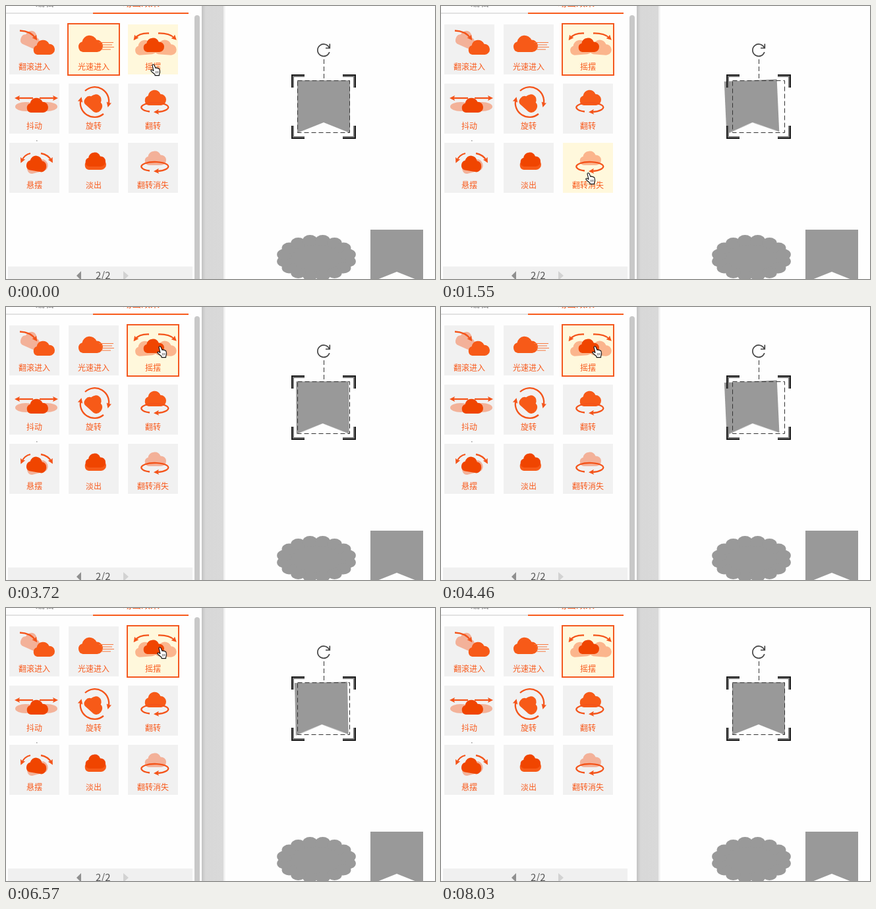
An HTML page that plays this animation: 651 by 415 pixels, repeating every 8870 ms.

```html
<!DOCTYPE html>
<html lang="zh-CN">
<head>
<meta charset="utf-8">
<title>动画效果</title>
<style>
html, body { margin: 0; width: 100%; height: 100%; overflow: hidden; background: #fefefe; }
svg { display: block; width: 651px; height: 415px; }
text { font-family: "Noto Sans CJK SC", "Noto Sans CJK", sans-serif; }
.label { font-size: 12px; fill: #f85a1c; text-anchor: middle; }
.mid { fill: #f75a18; }
.dark { fill: #f04500; }
.pale { fill: #f55a20; opacity: .42; }
.line { fill: none; stroke: #f4541a; stroke-width: 2.3; }
.speed { fill: none; stroke: #f7783f; }
.gray { fill: #999; }
.dash { fill: none; stroke: #333; stroke-dasharray: 7 4; }
#banner { transform-box: fill-box; transform-origin: center; }
</style>
</head>
<body>
<svg id="stage" viewBox="0 0 651 415">
  <defs>
    <path id="cloud" d="M8 24A7.5 7.5 0 0 1 7 9.5A10.5 10.5 0 0 1 27 7A8.5 8.5 0 0 1 28 24z"/>
    <marker id="head" viewBox="0 0 8 8" refX="4" refY="4" markerWidth="8" markerHeight="8" markerUnits="userSpaceOnUse" orient="auto-start-reverse">
      <path d="M0 0L8 4L0 8L1.5 4z" fill="#f4541a"/>
    </marker>
    <linearGradient id="gutter">
      <stop offset="0" stop-color="#c2c2c2"/>
      <stop offset=".18" stop-color="#d8d8d8"/>
      <stop offset="1" stop-color="#d9d9d9"/>
    </linearGradient>
    <g id="bracket" fill="none">
      <path d="M20 1H1V20" stroke="#1c1c1c" stroke-width="2"/>
      <path d="M20 3H3V20" stroke="#777" stroke-width="2"/>
    </g>
  </defs>

  <rect width="651" height="415" fill="#fefefe"/>
  <rect x="297" width="33" height="415" fill="url(#gutter)"/>
  <rect x="330" width="2.5" height="415" fill="#f0f0f0"/>

  <text x="45" y="0" font-size="14" fill="#666">编辑</text>
  <text x="177" y="0" font-size="14" fill="#f85a1c">动画效果</text>
  <rect y="10" width="132" height="2" fill="#e2e2e2"/>
  <rect x="132" y="10" width="145" height="2" fill="#f85a1c"/>
  <rect x="46" y="204" width="1.5" height="1.5" fill="#999"/>

  <g id="cells"></g>
  <rect id="select" y="27" width="78" height="78" fill="none" stroke="#f4581f" stroke-width="2"/>

  <rect id="bar" x="286" y="14" width="8" height="420" rx="4" fill="#c8c8c8"/>
  <rect x="3" y="396" width="280" height="19" fill="#f0f0f0"/>
  <path d="M107 410L114 403V417z" fill="#8f8f8f"/>
  <path d="M186 410L178 403V417z" fill="#d2d2d2"/>
  <text x="136" y="415" font-size="15" fill="#555">2/2</text>

  <g id="scallop" class="gray"><ellipse cx="471" cy="383" rx="52" ry="29"/></g>
  <path class="gray" d="M553 340H633V420L593 404L553 420z"/>

  <path id="banner" class="gray" d="M442 113H522V193L482 177L442 193z"/>
  <path class="dash" d="M482.5 81V113"/>
  <rect class="dash" x="442.5" y="113.5" width="79" height="79"/>
  <use href="#bracket" transform="translate(433 104)"/>
  <use href="#bracket" transform="translate(531 104) scale(-1 1)"/>
  <use href="#bracket" transform="translate(433 202) scale(1 -1)"/>
  <use href="#bracket" transform="translate(531 202) scale(-1 -1)"/>
  <path d="M490.5 63.5A9.2 9.2 0 1 0 490.8 70M491.3 57.5V64H485" fill="none" stroke="#444" stroke-width="1.7"/>

  <g id="cursor" stroke="#111" fill="#fff" stroke-linejoin="round">
    <g id="hand">
      <path d="M3 2Q4-.2 5.8 1.5L8 6.5Q9.2 5.2 10.2 6.6Q11.5 5.8 12.3 7.2Q13.6 7 14 8.5L14.6 12Q14.6 14 13.6 15.3V17.6H7V16L2.2 12Q.2 10 1.2 9.2Q2.6 8.5 4.2 10.2L5 10.4z" stroke-width="1.1"/>
      <path d="M8.4 11V14.5M10.4 11V14.5M12.3 11V14" fill="none" stroke-width=".6"/>
    </g>
    <path id="arrow" d="M.5.5V14.5L3.8 11.5L6.2 17L8.5 16L6.2 10.7H10.5z" fill="#111" stroke="#fff"/>
  </g>
</svg>
<script>
const LOOP = 8870, STEP = 56.67, WOBBLE = 1880;
const $ = id => document.getElementById(id);

const cloud = (x, y, w, h, cls = 'mid', turn = 0) =>
  `<use href="#cloud" class="${cls}" transform="translate(${x + w / 2} ${y + h / 2}) rotate(${turn}) scale(${w / 36} ${h / 24}) translate(-18 -12)"/>`;
const line = d => `<path class="line" d="${d}" marker-end="url(#head)"/>`;
const oval = x => `<ellipse class="pale" cx="${x}" cy="35" rx="16" ry="7"/>`;
const ring = line('M33 42.5A20.5 7 0 1 1 43 43');

// Icons are drawn inside a 76 x 76 cell.
const effects = [
  ['翻滚进入', cloud(17, 9, 31, 25, 'pale', 24) + cloud(35, 23, 34, 23) + line('M16 9.5Q32 10 40 21')],
  ['光速进入', cloud(13, 16, 39, 26) +
    '<path class="speed" d="M46 27.5H68M49 31H66M50 34.5H69M49 38H64"/>'],
  ['摇摆', cloud(9, 23, 35, 23, 'pale', -4) + cloud(39, 23, 35, 23, 'pale', 4) + cloud(22, 20, 33, 22, 'dark') +
    line('M32 13.5Q17 13 11 21') + line('M46 13.5Q63 13 71 21')],
  ['抖动', oval(25) + oval(57) + cloud(25, 21, 34, 23, 'dark') + line('M36 22H12') + line('M46 22H70')],
  ['旋转', cloud(24, 15, 31, 25, 'mid', 42) +
    line('M25 11A21.5 21.5 0 0 1 60.5 32') + line('M53 46A21.5 21.5 0 0 1 18.5 24')],
  ['翻转', cloud(24, 9, 34, 24) + ring],
  ['悬摆', cloud(24, 20, 34, 25, 'pale', -14) + cloud(25, 19, 32, 24, 'dark', 10) +
    line('M32 16Q23 18 19 27') + line('M48 16Q59 18 64 27')],
  ['淡出', cloud(23, 18, 34, 23) + cloud(24, 14, 32, 22, 'dark')],
  ['翻转消失', cloud(24, 12, 34, 22, 'pale') + ring]
];

$('cells').innerHTML = effects.map(([name, icon], i) => `
  <g transform="translate(${5 + i % 3 * 90} ${28 + Math.floor(i / 3) * 90})">
    <rect class="cell" width="76" height="76"/>${icon}
    <text class="label" x="38" y="69">${name}</text>
  </g>`).join('');
const cells = document.querySelectorAll('.cell');

for (let i = 0; i < 16; i++) {
  const a = (i + 0.5) * Math.PI / 8;
  $('scallop').insertAdjacentHTML('beforeend',
    `<ellipse cx="${471 + 49.5 * Math.cos(a)}" cy="${383 + 27 * Math.sin(a)}" rx="11.3" ry="8.5"/>`);
}

// Wobble: offset, shift in px, tilt in degrees.
const wobble = $('banner').animate(
  [[0, 0, 0], [.15, -20, -5], [.3, 16, 3], [.45, -12, -3], [.6, 8, 2], [.75, -4, -1], [1, 0, 0]]
    .map(([offset, x, r]) => ({ offset, easing: 'ease', transform: `translateX(${x}px) rotate(${r}deg)` })),
  { duration: WOBBLE, fill: 'both' });
wobble.pause();

// First visible step of each run and the time already elapsed in it.
const runs = [[740, 77], [3720, 25], [6280, 77]];

const path = [
  [0, 219, 88], [700, 219, 88], [1030, 214, 135], [1450, 219, 253], [2320, 219, 253],
  [2530, 227, 104], [2710, 227, 104], [2880, 227, 58], [3310, 227, 58], [3420, 229, 59],
  [6620, 229, 59], [7120, 313, 333], [7350, 318, 391], [LOOP, 318, 391]
];

// Cell index, hover start and end.
const hovers = [[5, 1110, 1340], [8, 1340, 2420], [5, 2420, 2590]];

function along(t) {
  const i = path.findIndex(p => p[0] > t);
  const [t0, x0, y0] = path[i - 1], [t1, x1, y1] = path[i];
  const k = (t - t0) / (t1 - t0);
  return [x0 + (x1 - x0) * k, y0 + (y1 - y0) * k];
}

function draw(t) {
  const run = runs.filter(r => r[0] <= t).pop();
  wobble.currentTime = run
    ? Math.min(WOBBLE, Math.floor((t - run[0]) / STEP) * STEP + run[1]) : 0;

  const picked = t < 530 ? 1 : 2;
  $('select').setAttribute('x', 4 + picked * 90);
  cells.forEach((cell, i) => {
    const lit = i === picked || (i === 2 && t < 530) ||
      hovers.some(([c, from, to]) => c === i && t >= from && t < to);
    cell.setAttribute('fill', lit ? '#fff8dc' : '#f1f1f1');
  });

  const [x, y] = along(t), outside = x > 263;
  $('cursor').setAttribute('transform', `translate(${Math.round(x)} ${Math.round(y)})`);
  $('cursor').style.display = t < 7450 ? '' : 'none';
  $('hand').style.display = outside ? 'none' : '';
  $('arrow').style.display = outside ? '' : 'none';
  $('bar').style.opacity = Math.max(0, Math.min(1, (7700 - t) / 800));
}

const start = performance.now();
function tick() {
  draw((performance.now() - start) % LOOP);
  requestAnimationFrame(tick);
}
tick();
</script>
</body>
</html>
```
